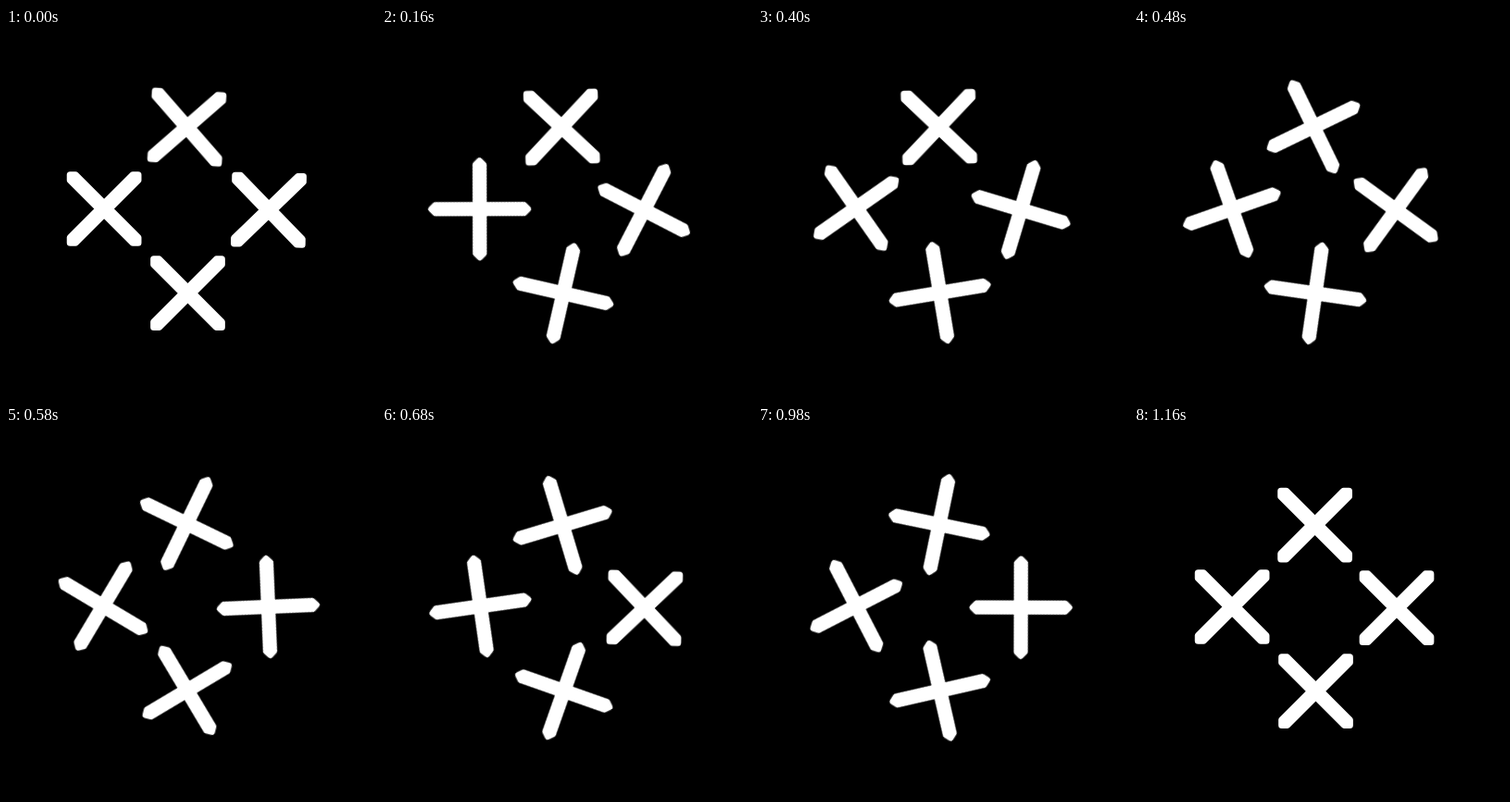
An HTML page that plays this animation: 400x400 px, repeating every 1.24 s.

```html
<!DOCTYPE html>
<html lang="en">
<head>
<meta charset="utf-8">
<title>Spinning crosses</title>
<style>
  html, body { margin: 0; width: 100%; height: 100%; overflow: hidden; background: #000; }
  svg { display: block; width: 100%; height: 100%; }
  #stage { filter: blur(0.5px); }
</style>
</head>
<body>
<svg viewBox="0 0 400 400">
  <defs>
    <path id="bar" d="M-52 0 l4.1 -4.1 H47.9 l4.1 4.1 l-4.1 4.1 H-47.9 Z"
      fill="#fff" stroke="#fff" stroke-width="7.2" stroke-linejoin="round"/>
    <g id="cross">
      <use href="#bar" transform="rotate(45)"/>
      <use href="#bar" transform="rotate(-45)"/>
    </g>
  </defs>
  <rect width="400" height="400" fill="#000"/>
  <g id="stage"></g>
</svg>
<script>
const LOOP = 1240, STEP = 20, SPIN = 1140, TURN = 1080;

// pivot, start time, and how far the shape sits off its pivot
const crosses = [
  { x: 194.9, y: 106.4, start: -40, off: 0.7 },
  { x: 283.5, y: 196.2, start: -20, off: 0.5 },
  { x: 196.1, y: 286.3, start: 0, off: 0.4 },
  { x: 105.6, y: 195, start: 20, off: 0.5 }
];

const stage = document.getElementById('stage');
for (const c of crosses) {
  c.el = document.createElementNS('http://www.w3.org/2000/svg', 'use');
  c.el.setAttribute('href', '#cross');
  stage.appendChild(c.el);
}

function ease(u) {
  u = Math.min(1, Math.max(0, u));
  return u * u * (3 - 2 * u);
}

function draw(ms) {
  const t = Math.floor((ms % LOOP) / STEP + 0.02) * STEP % LOOP;
  for (const c of crosses) {
    const angle = TURN * ease((t - c.start) / SPIN);
    c.el.setAttribute('transform',
      `translate(${c.x} ${c.y}) rotate(${angle}) translate(${c.off} ${c.off})`);
  }
}

function tick() {
  draw(performance.now());
  requestAnimationFrame(tick);
}

draw(0);
requestAnimationFrame(tick);
</script>
</body>
</html>
```
